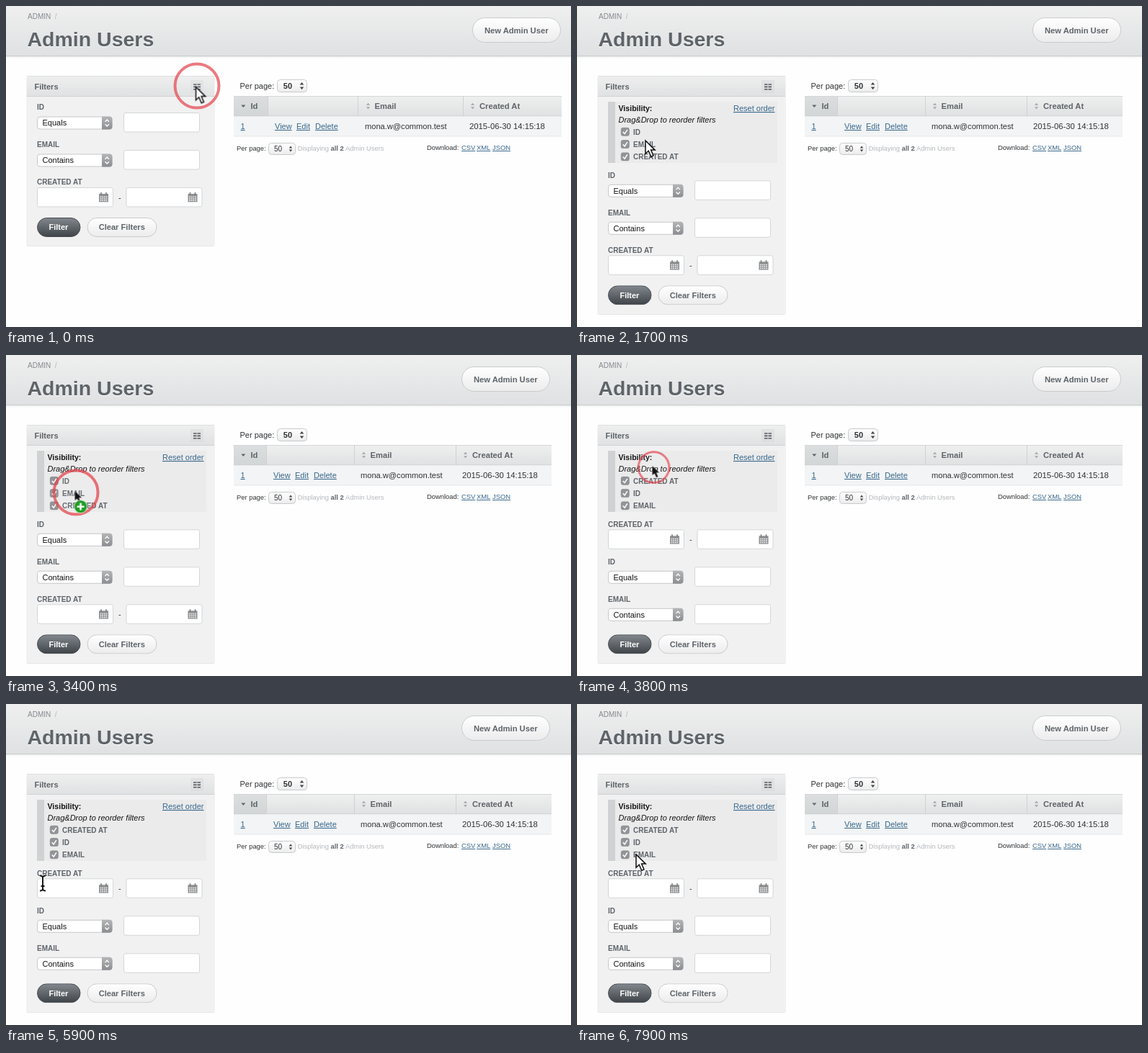
These frames come from a looping animation (784x446 px, 8 s). An HTML page:

```html
<!DOCTYPE html>
<html lang="en">
<head>
<meta charset="utf-8">
<title>Admin Users</title>
<style>
html, body { margin: 0; width: 100%; height: 100%; overflow: hidden; background: #fefefe; }
svg { display: block; width: 100vw; height: 100vh; font: 11px "Liberation Sans", Arial, sans-serif; }
text { fill: #303235; white-space: pre; }
.b { font-weight: bold; }
.head { font-weight: bold; fill: #5e6469; font-size: 11.2px; }
.label { font-weight: bold; fill: #5e6469; font-size: 10px; }
.small { font-size: 9.4px; }
.link { fill: #38678b; text-decoration: underline; }
.value { fill: #151515; }
.field { fill: #fff; stroke: #d3d5d7; }
.pill { fill: url(#pale); stroke: #c8cacc; }

/* hard changes */
.open, .grow, .show, .order, .arrow, .drag, .plus, .beam { animation: 8s step-end infinite; }
.open { animation-name: open; }
.grow { animation-name: grow; }
.show { animation-name: show; }
.order { animation-name: order; }
.arrow { animation-name: arrow; }
.drag { animation-name: drag; }
.plus { animation-name: plus; }
.beam { animation-name: beam; }
@keyframes open { 2.5%, to { transform: translate(var(--x, 0px), var(--y, 0px)); } }
@keyframes grow { 2.5%, to { width: var(--w); height: var(--h); } }
@keyframes show { 0% { opacity: 0; } 2.5%, to { opacity: 1; } }
@keyframes order {
  0% { transform: translateY(var(--a)); }
  43.75% { transform: translateY(var(--m)); }
  46.25%, to { transform: translateY(var(--z)); }
}
@keyframes arrow { 0%, 62.5%, 75.6% { opacity: 1; } 30%, 70% { opacity: 0; } to { opacity: 1; } }
@keyframes drag { 0%, 62.5%, to { opacity: 0; } 30% { opacity: 1; } }
@keyframes plus { 0%, 46.25%, to { opacity: 0; } 31.25% { opacity: 1; } }
@keyframes beam { 0%, 75.6%, to { opacity: 0; } 70% { opacity: 1; } }

/* pointer */
.pointer { animation: move 8s ease-in-out infinite; }
@keyframes move {
  0%, 8.75% { transform: translate(263.5px, 112.5px); }
  18.75% { transform: translate(119px, 168px); }
  21.25%, 22.5% { transform: translate(95px, 187px); }
  27.5%, 30% { transform: translate(86px, 207px); }
  31.25%, 40% { transform: translate(91px, 206.5px); }
  46.25%, 51.25% { transform: translate(104.5px, 154px); }
  61.25%, 62.5% { transform: translate(87.5px, 205px); }
  72.5%, 75% { transform: translate(51px, 249px); }
  77.5%, 81.25% { transform: translate(50px, 294px); }
  86% { transform: translate(50px, 338px); }
  91.25% { transform: translate(65px, 290px); }
  98.75%, to { transform: translate(82px, 209px); }
}
.ring { animation: ring 8s step-end infinite; }
@keyframes ring {
  0% { transform: translate(1.5px, -1.5px); opacity: .72; }
  2.5% { transform: translate(2px, 2px) scale(.7); opacity: 0; }
  30% { transform: translate(2px, 2px) scale(.7); opacity: .72; }
  31.25% { transform: translate(1.5px, 2px); opacity: .76; }
  47.5% { transform: translate(2px, 2px) scale(.7); opacity: .72; }
  48.75%, to { transform: translate(2px, 2px) scale(.7); opacity: 0; }
}
</style>
</head>
<body>
<svg viewBox="0 0 784 446">
  <defs>
    <linearGradient id="bar" x2="0" y2="1"><stop stop-color="#efefef"/><stop offset="1" stop-color="#dfe1e2"/></linearGradient>
    <linearGradient id="pale" x2="0" y2="1"><stop stop-color="#fff"/><stop offset="1" stop-color="#ececed"/></linearGradient>
    <linearGradient id="dark" x2="0" y2="1"><stop stop-color="#82888d"/><stop offset="1" stop-color="#3f4449"/></linearGradient>
    <linearGradient id="knob" x2="0" y2="1"><stop stop-color="#b4b5b7"/><stop offset="1" stop-color="#8b8d90"/></linearGradient>
    <linearGradient id="fade" x2="0" y2="1"><stop stop-color="#000" stop-opacity=".07"/><stop offset="1" stop-color="#000" stop-opacity="0"/></linearGradient>

    <path id="sort" d="M-2.6 -1.2L0 -4.2L2.6 -1.2ZM-2.6 1.2L0 4.2L2.6 1.2Z" fill="#a3a7aa"/>
    <path id="arrows" d="M-2.8 -1.4L0 -5L2.8 -1.4ZM-2.8 1.4L0 5L2.8 1.4Z" fill="#444"/>
    <g id="select">
      <rect x="43.5" y="154" width="103.5" height="17" rx="3.5" fill="#fff" stroke="#c6c7c9"/>
      <path d="M133 153.5H143.5Q147.5 153.5 147.5 157.5V167.5Q147.5 171.5 143.5 171.5H133Z" fill="url(#knob)"/>
      <path d="M137.5 160.8L140.2 158L142.9 160.8M137.5 164.2L140.2 167L142.9 164.2" fill="none" stroke="#fff" stroke-width="1.3"/>
    </g>
    <rect id="input" class="field" x="163.5" y="148.5" width="105" height="26.5" rx="2.5"/>
    <g id="date">
      <rect class="field" x="43.5" y="148.5" width="105" height="26.5" rx="2.5"/>
      <path d="M129 157H142V168.3H129Z" fill="#8e9092"/>
      <path d="M130.6 161.2H141M130.6 163.7H141M130.6 166.2H141" stroke="#f4f4f4" stroke-width="1.5" stroke-dasharray="1.7 1"/>
      <path d="M132 155V158.6M139 155V158.6" stroke="#7c7e80" stroke-width="1.6"/>
    </g>
    <g id="check">
      <rect x="61.3" y="169.3" width="11" height="11" rx="2.2" fill="#929497" stroke="#808388" stroke-width=".7"/>
      <path d="M63.8 175L66.1 177.6L69.9 171.8" fill="none" stroke="#fff" stroke-width="1.5"/>
    </g>
    <path id="tip" d="M0 0V18.2L4.2 14.3L7.7 22.3L11 20.9L7.6 13.1H13.2Z"/>
    <path id="caret" d="M-4 -10.5Q0 -10.5 0 -7.5V7.5Q0 10.5 -4 10.5M4 -10.5Q0 -10.5 0 -7.5M0 7.5Q0 10.5 4 10.5M-2.5 4H2.5"/>
  </defs>

  <!-- title bar -->
  <rect width="784" height="70" fill="url(#bar)"/>
  <rect y="70" width="784" height="3" fill="url(#fade)"/>
  <path d="M0 69.5H784" stroke="#c8cacb"/>
  <text x="30" y="18" font-size="10" style="fill:#85898d">ADMIN <tspan fill="#b5b8ba"> /</tspan></text>
  <g class="b" font-size="28.5">
    <text x="29.5" y="56.5" style="fill:#fff">Admin Users</text>
    <text x="29.5" y="55.5" style="fill:#5e6469">Admin Users</text>
  </g>
  <g class="open" style="--x:-15px">
    <rect class="pill" x="647.5" y="16.5" width="122" height="34" rx="17"/>
    <text class="head" x="664" y="38">New Admin User</text>
  </g>

  <!-- filter panel -->
  <rect class="grow" style="--w:261px;--h:331px" x="28.5" y="98" width="261" height="236" rx="2" fill="#e5e6e7"/>
  <rect class="grow" style="--w:260px;--h:330px" x="29" y="98" width="260" height="235" fill="#f1f1f2"/>
  <rect x="29" y="97" width="260" height="29" fill="url(#bar)"/>
  <path d="M29 97.5H289" stroke="#dcdedf"/>
  <path d="M29 125.5H289" stroke="#cfd1d2"/>
  <text class="head" x="39.5" y="116" style="font-size:11px">Filters</text>
  <rect x="256" y="103" width="18" height="18" fill="#d9dbdc" opacity=".55"/>
  <path d="M260 109H270M260 112.4H270M260 115.8H270" stroke="#55595d" stroke-width="1.6" stroke-dasharray="4.5 1 4.5 0"/>

  <g class="show">
    <rect x="43" y="133" width="235" height="85" fill="#ebebec"/>
    <rect x="43" y="133" width="10" height="85" fill="#d0d1d2"/>
    <text class="b value" x="57.5" y="146" font-size="10.6">Visibility:</text>
    <text class="link" x="217" y="146">Reset order</text>
    <text class="value" x="57.5" y="162.3" font-style="italic">Drag&amp;Drop to reorder filters</text>
    <g class="order" style="--a:0px;--m:0px;--z:17.3px"><use href="#check"/><text class="label" x="78" y="178.5">ID</text></g>
    <g class="order" style="--a:17.3px;--m:34.6px;--z:34.6px"><use href="#check"/><text class="label" x="78" y="178.5">EMAIL</text></g>
    <g class="order" style="--a:34.6px;--m:17.3px;--z:0px"><use href="#check"/><text class="label" x="78" y="178.5">CREATED AT</text></g>
  </g>

  <g class="open" style="--y:94.3px">
    <g class="order" style="--a:0px;--m:0px;--z:52px">
      <text class="label" x="43" y="144.3">ID</text>
      <use href="#select"/><text class="value" x="50.5" y="166.3">Equals</text>
      <use href="#input"/>
    </g>
    <g class="order" style="--a:52px;--m:52px;--z:104px">
      <text class="label" x="43" y="144.3">EMAIL</text>
      <use href="#select"/><text class="value" x="50.5" y="166.3">Contains</text>
      <use href="#input"/>
    </g>
    <g class="order" style="--a:104px;--m:104px;--z:0px">
      <text class="label" x="43" y="144.3">CREATED AT</text>
      <use href="#date"/><use href="#date" x="123.5"/>
      <text x="156" y="166">-</text>
    </g>
    <rect x="43.5" y="294.5" width="59.5" height="26" rx="13" fill="url(#dark)" stroke="#484d52"/>
    <text class="b" x="59.5" y="311.3" style="fill:#fff">Filter</text>
    <rect class="pill" x="113" y="294.5" width="96" height="26" rx="13"/>
    <text class="head" x="128.7" y="311.3" style="font-size:11.1px">Clear Filters</text>
  </g>

  <!-- table -->
  <text x="324.5" y="115">Per page:</text>
  <rect class="pill" x="376.5" y="102.5" width="41" height="17" rx="4"/>
  <text class="b" x="384.8" y="115">50</text>
  <use href="#arrows" x="410.5" y="111"/>

  <rect class="grow" style="--w:441px;--h:28px" x="316" y="125" width="455" height="28" fill="url(#bar)"/>
  <rect class="grow" style="--w:45px;--h:28px" x="316" y="125" width="47" height="28" fill="#bfc3c6" opacity=".4"/>
  <rect class="grow" style="--w:441px;--h:1px" x="316" y="125" width="455" height="1" fill="#d4d6d7"/>
  <rect class="grow" style="--w:441px;--h:1px" x="316" y="152.5" width="455" height="1" fill="#cbcdcf"/>
  <rect class="grow" style="--w:441px;--h:27.5px" x="316" y="153.5" width="455" height="27.5" fill="#f2f4f5"/>
  <rect class="grow" style="--w:441px;--h:1px" x="316" y="180.5" width="455" height="1" fill="#e6e8e9"/>

  <path d="M326.3 137.5H332.3L329.3 141Z" fill="#5e6469"/>
  <text class="head" x="339.5" y="143">Id</text>
  <text class="link" x="325.5" y="171">1</text>
  <g class="open" style="--x:-2px">
    <path d="M363.5 125V153" stroke="#cfd1d3"/>
    <text class="link" x="373" y="171">View</text>
    <text class="link" x="403" y="171">Edit</text>
    <text class="link" x="429" y="171">Delete</text>
  </g>
  <path class="open" style="--x:-5px" d="M488.5 125V153" stroke="#cfd1d3"/>
  <g class="open" style="--x:-6px">
    <use href="#sort" x="502.5" y="139"/>
    <text class="head" x="511.5" y="143">Email</text>
    <text x="498" y="171" font-size="11.1">mona.w@common.test</text>
  </g>
  <g class="open" style="--x:-10px">
    <path d="M634.5 125V153" stroke="#cfd1d3"/>
    <use href="#sort" x="647.5" y="139"/>
    <text class="head" x="657" y="143">Created At</text>
    <text x="643" y="171" font-size="11.3">2015-06-30 14:15:18</text>
  </g>

  <g class="small">
    <text x="320" y="201">Per page:</text>
    <rect class="pill" x="364.5" y="190.5" width="37" height="16" rx="4"/>
    <text x="372" y="202" font-size="10">50</text>
    <use href="#arrows" transform="translate(395 198.5) scale(.8)"/>
    <text x="404.7" y="201" style="fill:#b4b7ba">Displaying <tspan class="b" fill="#5e6469">all 2</tspan> Admin Users</text>
    <text x="584" y="200">Download:</text>
    <text class="link" x="632" y="200">CSV</text>
    <text class="link" x="653" y="200">XML</text>
    <text class="link" x="675" y="200">JSON</text>
  </g>

  <!-- pointer -->
  <g class="pointer">
    <circle class="ring" r="30.5" fill="#fff" fill-opacity=".08" stroke="#e4474f" stroke-width="4"/>
    <use class="arrow" href="#tip" fill="#fff" stroke="#111" stroke-width="1.5"/>
    <g class="drag">
      <use href="#tip" transform="scale(.72)" fill="#111" stroke="#fff" stroke-width="1.2" paint-order="stroke"/>
      <g class="plus">
        <circle cx="8" cy="21.7" r="9" fill="#1d9e22" stroke="#e9f4e9" stroke-width=".8"/>
        <path d="M3 21.7H13M8 16.7V26.7" stroke="#fff" stroke-width="2.6"/>
      </g>
    </g>
    <g class="beam" fill="none">
      <use href="#caret" stroke="#fff" stroke-width="3.6"/>
      <use href="#caret" stroke="#111" stroke-width="1.9"/>
    </g>
  </g>
</svg>
</body>
</html>
```
